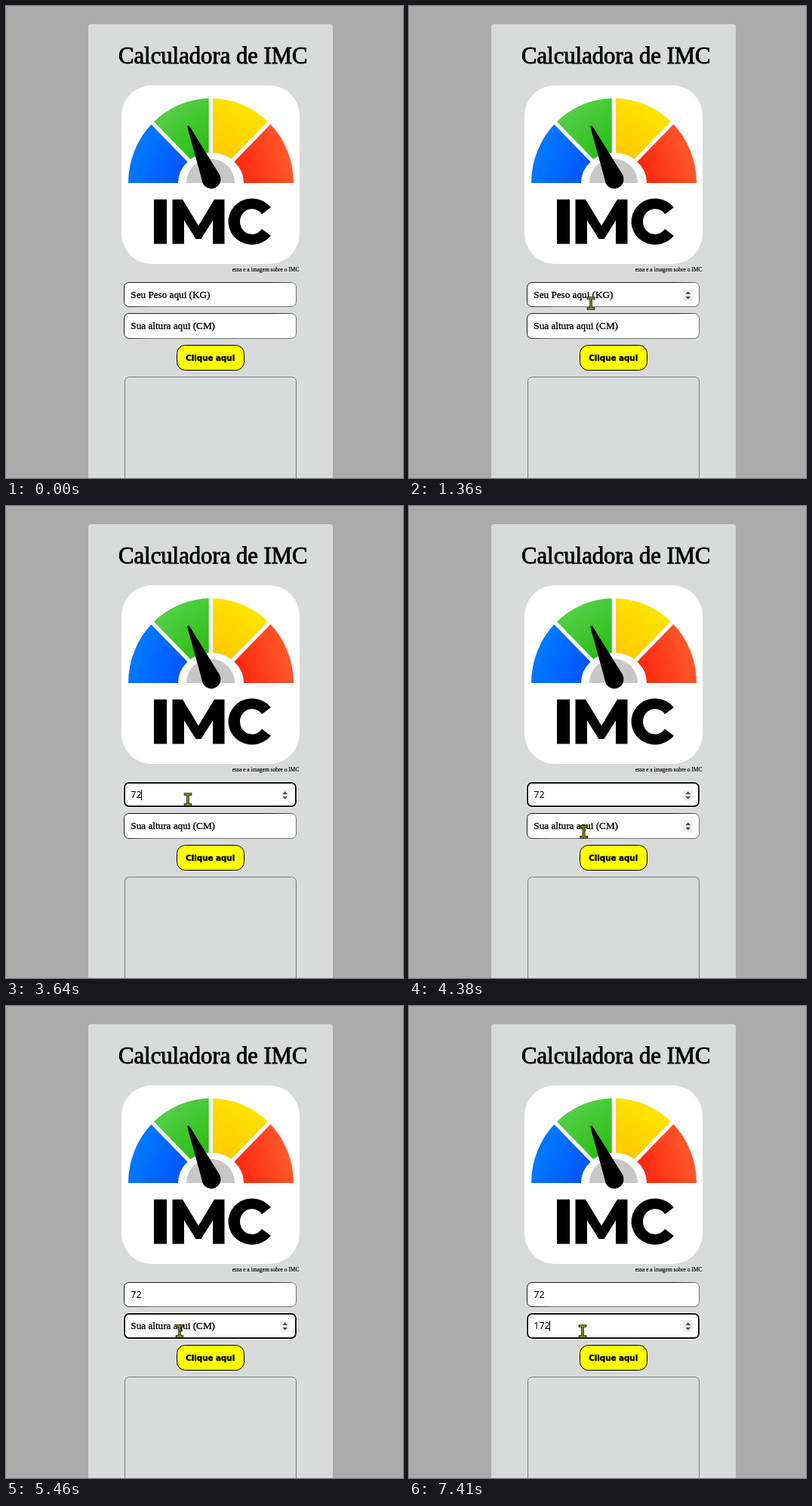
An HTML page with a canvas that plays this animation: 526x624 px, repeating every 8000 ms.

```html
<!DOCTYPE html>
<html lang="pt">
<head>
<meta charset="utf-8">
<title>Calculadora de IMC</title>
<style>
html, body { margin: 0; width: 100%; height: 100%; overflow: hidden; background: #ababab; }
canvas { display: block; }
</style>
</head>
<body>
<canvas id="stage" width="526" height="624"></canvas>
<script>
const ctx = document.getElementById('stage').getContext('2d');
const LOOP = 8000, STEP = 70, BLINK = 530, CLICK = 140;
const SERIF = '"Liberation Serif", serif';

const START = { x: 474, y: 607 };
const MOVES = [
  { from: 240, to: 730, x: 274.7, y: 400.7 },
  { from: 730, to: 1010, x: 241, y: 399 },
  { from: 1290, to: 1430, x: 241, y: 391 },
  { from: 1890, to: 1960, x: 241, y: 388 },
  { from: 4110, to: 4450, x: 230, y: 438 },
  { from: 4650, to: 4860, x: 230, y: 430 }
];

const FIELDS = [
  { y: 365, h: 33, hint: 'Seu Peso aqui (KG)', value: '72', keys: [3300, 3640], focus: 2160, blur: 4930 },
  { y: 406, h: 34, hint: 'Sua altura aqui (CM)', value: '172', keys: [6260, 6530, 7410], focus: 4930, blur: LOOP }
];

function box(x, y, w, h, r, fill, stroke, line = 1) {
  ctx.beginPath();
  ctx.roundRect(x, y, w, h, r);
  if (fill) { ctx.fillStyle = fill; ctx.fill(); }
  if (stroke) { ctx.strokeStyle = stroke; ctx.lineWidth = line; ctx.stroke(); }
}

function poly(points, fill, stroke) {
  ctx.beginPath();
  points.forEach(([x, y]) => ctx.lineTo(x, y));
  ctx.closePath();
  ctx.fillStyle = fill;
  ctx.fill();
  if (stroke) { ctx.strokeStyle = stroke; ctx.lineWidth = 1; ctx.stroke(); }
}

function disc(x, y, r, fill, from = 0, to = 2 * Math.PI) {
  ctx.beginPath();
  ctx.arc(x, y, r, from, to);
  ctx.fillStyle = fill;
  ctx.fill();
}

function label(text, x, y, font, weight = 0, align = 'left') {
  ctx.font = font;
  ctx.textAlign = align;
  ctx.fillStyle = ctx.strokeStyle = '#000';
  ctx.fillText(text, x, y);
  if (weight) { ctx.lineWidth = weight; ctx.strokeText(text, x, y); }
}

function blend(x0, y0, x1, y1, from, to) {
  const g = ctx.createLinearGradient(x0, y0, x1, y1);
  g.addColorStop(0, from);
  g.addColorStop(1, to);
  return g;
}

function slice(index, fill) {
  const from = Math.PI * (1 + index / 4), to = from + Math.PI / 4;
  ctx.beginPath();
  ctx.ellipse(271.5, 234, 109.5, 112, 0, from, to);
  ctx.ellipse(271.5, 234, 43.5, 40, 0, to, from, true);
  ctx.closePath();
  ctx.fillStyle = fill;
  ctx.fill();
}

function gauge() {
  box(153, 105, 236, 236, 40, '#fff');
  slice(0, blend(165, 190, 235, 220, '#007dff', '#0055ff'));
  slice(1, blend(215, 135, 260, 195, '#55cf48', '#2abf14'));
  slice(2, blend(325, 135, 285, 195, '#ffe400', '#ffcb00'));
  slice(3, blend(310, 220, 375, 200, '#ff2810', '#ff582a'));

  ctx.strokeStyle = '#fff';
  ctx.lineWidth = 5.2;
  for (const dx of [-90, 0, 90]) {
    ctx.beginPath();
    ctx.moveTo(271.3, 234);
    ctx.lineTo(271.3 + dx, dx ? 141.5 : 115);
    ctx.stroke();
  }

  disc(271, 234, 32, '#c9c7c6', Math.PI, 0);
  poly([[240, 159], [242.5, 158], [283.3, 223.5], [260.3, 232.5]], '#000');
  disc(272, 229, 12.4, '#000');
  wordmark();
}

// Heavy geometric letters I, M, C
function wordmark() {
  const top = 255.7, base = 314.5, mid = 255;
  ctx.fillStyle = '#000';
  ctx.fillRect(196, top, 17, base - top);

  const half = [[34.5, base], [34.5, top], [21, top], [0, 290.5]];
  const inner = [[3.5, 308], [19, 283.5], [19, base]];
  const flip = ([dx, y]) => [mid - dx, y];
  const unflip = ([dx, y]) => [mid + dx, y];
  poly([...half.map(flip), ...half.map(unflip).reverse(),
    ...inner.map(unflip).reverse(), ...inner.map(flip)], '#000');

  ctx.beginPath();
  ctx.ellipse(326, 285, 31.5, 30.5, 0, -0.66, 0.66, true);
  ctx.ellipse(326, 285, 16, 16.8, 0, 0.62, -0.62);
  ctx.fill();
}

function spinner(y) {
  ctx.fillStyle = '#f2f2f2';
  ctx.fillRect(363, y + 10, 13, 15);
  for (const dir of [-1, 1]) {
    const foot = y + 17.5 + dir * 1.5;
    poly([[366.3, foot], [369.7, foot + dir * 3.8], [373.2, foot]], '#505050');
  }
}

const isOver = (p, top, bottom) => p.x > 156 && p.x < 385 && p.y >= top && p.y < bottom;

function field(f, t, p) {
  const { y, h } = f;
  const focused = t >= f.focus && t < f.blur;
  if (focused) {
    box(155, y - 1, 231, h + 2, 8, '#fff');
    box(157, y + 1, 227, h - 2, 6, '#fff', '#101010', 2);
  } else {
    // Dark top and left edges, grey bottom and right
    const cy = y + h / 2;
    box(156.5, y + 0.5, 228, h - 1, 6.5, '#fff', blend(270, cy - 3, 271, cy + 3, '#1c1c1c', '#747474'));
  }
  if (focused || isOver(p, y - 6, y + 35)) spinner(y);

  const pressed = f.keys.filter(at => t >= at);
  const typed = f.value.slice(0, pressed.length);
  let end = 166;
  if (typed) {
    label(typed, 165.3, y + 21, '12.5px "Noto Sans", sans-serif');
    end = Math.floor(165.4 + ctx.measureText(typed).width);
  } else {
    label(f.hint, 165.3, y + 21, '13.2px ' + SERIF, 0.3);
  }

  const since = t - Math.max(f.focus, ...pressed);
  if (focused && Math.floor(since / BLINK) % 2 === 0) {
    ctx.fillStyle = '#000';
    ctx.fillRect(end, y + 10, 1, 14);
  }
}

function pointerAt(t) {
  const p = { ...START };
  for (const m of MOVES) {
    if (t < m.from) break;
    const time = Math.floor((t - m.from) / STEP) * STEP;
    const k = Math.min(1, time / (m.to - m.from));
    const ease = 1 - (1 - k) ** 2;
    p.x += (m.x - p.x) * ease;
    p.y += (m.y - p.y) * ease;
  }
  return p;
}

function arrow(x, y) {
  const shape = [[0.5, 0.5], [0.5, 15.5], [4, 12.3], [6.5, 18], [9, 17], [6.6, 11.5], [11.5, 11.5]];
  poly(shape.map(([dx, dy]) => [x + dx, y + dy]), '#ffff20', '#000');
}

function beam(x, y) {
  for (const [width, reach, color] of [[3.6, 5.3, '#1c1c08'], [1.4, 4.3, '#a3a334']]) {
    ctx.strokeStyle = color;
    ctx.lineWidth = width;
    ctx.beginPath();
    for (const dy of [-7, 7]) {
      ctx.moveTo(x - reach, y + dy);
      ctx.lineTo(x + reach, y + dy);
    }
    ctx.moveTo(x, y - 7);
    ctx.lineTo(x, y + 7);
    ctx.stroke();
  }
}

function pointer(t, p) {
  if (t < MOVES[0].from) return;
  const shape = FIELDS.some(f => isOver(p, f.y, f.y + 35)) ? beam : arrow;
  shape(p.x, p.y);
  if (FIELDS.some(f => t >= f.focus && t < f.focus + CLICK)) {
    disc(p.x - 0.5, p.y - 0.5, 9.5, 'rgba(228,222,20,.65)');
  }
}

function draw(t) {
  const p = pointerAt(t);
  ctx.fillStyle = '#ababab';
  ctx.fillRect(0, 0, 526, 624);
  box(109, 24, 324, 620, 4, '#d9dbda');
  label('Calculadora de IMC', 274.3, 75.5, '30.7px ' + SERIF, 0.9, 'center');
  gauge();
  label('essa e a imagem sobre o IMC', 388.5, 351, '7.5px ' + SERIF, 0.15, 'right');
  FIELDS.forEach(f => field(f, t, p));
  box(226.5, 448.5, 89, 33, 11, '#ffff00', '#000');
  label('Clique aqui', 270.7, 469, 'bold 10.3px "DejaVu Sans", sans-serif', 0.4, 'center');
  box(157.5, 490.5, 227, 160, 6, null, '#7b7b7b');
  pointer(t, p);
}

function tick() {
  draw(performance.now() % LOOP);
  requestAnimationFrame(tick);
}
tick();
</script>
</body>
</html>
```
